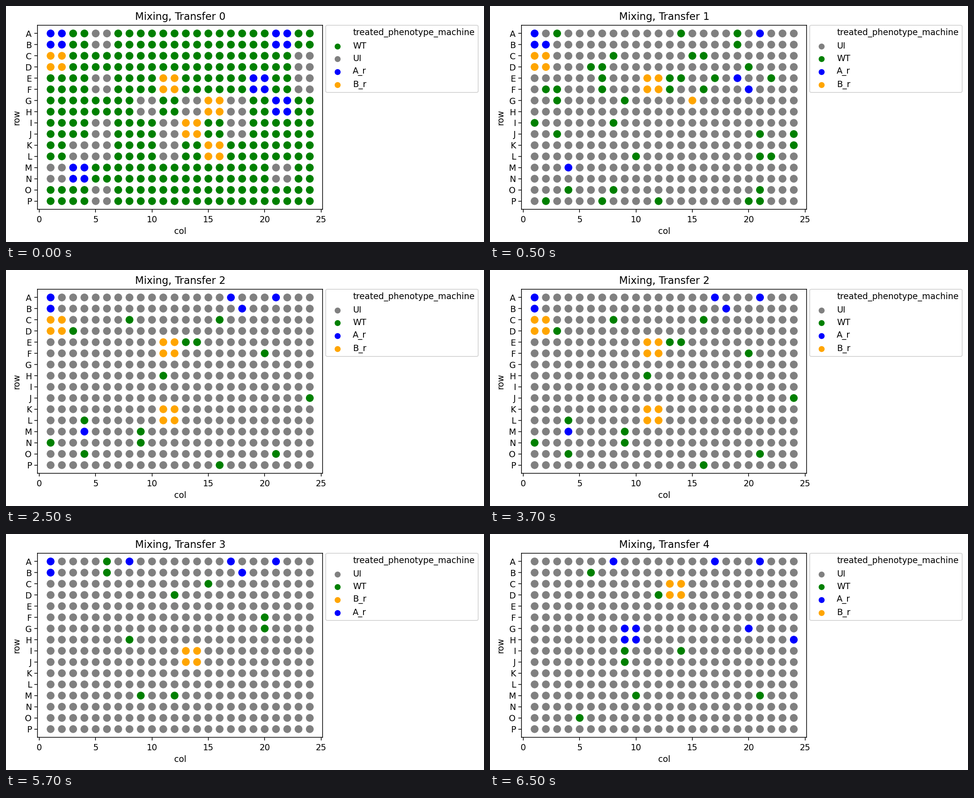
A matplotlib script that plays this animation: 1063x527 px, repeating every 8000 ms.

```python
import matplotlib.pyplot as plt
from matplotlib.animation import FuncAnimation
from matplotlib.colors import to_rgba

W, H, DPI = 1063, 527, 136
LEFT, TOP, RIGHT, BOTTOM = 70.4, 42.6, 704.4, 454.4
ROWS = "ABCDEFGHIJKLMNOP"
COLS = range(1, 25)
COLORS = {"WT": "green", "UI": "gray", "A_r": "blue", "B_r": "orange"}

# Each plate lists its phenotypes in legend order; the first one fills the rest.
# Wells are given singly (A1) or as a rectangle (A1:B2).
PLATES = [
    {"WT": "",
     "UI": "A5:B6 C23:F24 E5:F6 G9:H10 G13:H14 G17:J18 I5:L6 I11:L12 "
           "K3:L4 M1:N2 M21:N22 O5:P6",
     "A_r": "A1:B2 A21:B22 E19:F20 G21:H22 M3:N4",
     "B_r": "C1:D2 E11:F12 G15:H16 I13:J14 K15:L16"},
    {"UI": "",
     "WT": "A3 A14 A19:B19 C8 C15:C16 D6:D7 D20 E7:F7 E13:E14 E17 E22 "
           "F2:F3 F13 F16 G3 G9 I1 I8 J3 J21 J24:K24 L10 L21:L22 "
           "O4 O8 O21:P21 P2 P7 P12 P20",
     "A_r": "A1:B1 A21 B2 E19 F20 M4",
     "B_r": "C1:D2 E11:F12 G15"},
    {"UI": "",
     "WT": "C8 C16 D3 E13:E14 F20 H11 J24 L4 M9:N9 N1 O4 O21 P16",
     "A_r": "A1:B1 A17 A21 B18 M4",
     "B_r": "C1:D2 E11:F12 K11:L12"},
    {"UI": "",
     "WT": "A6:B6 C15 D12 F20:G20 H8 M9 M12",
     "B_r": "I13:J14",
     "A_r": "A1:B1 A8 A17 A21 B18"},
    {"UI": "",
     "WT": "B6 D12 I9:J9 I14 M10 M21 O5",
     "A_r": "A8 A17 A21 G9:H10 G20 H24",
     "B_r": "C13:D14"},
]


def parse(well):
    return ROWS.index(well[0]), int(well[1:])


def wells(spec):
    for item in spec.split():
        first, _, last = item.partition(":")
        r0, c0 = parse(first)
        r1, c1 = parse(last or first)
        for r in range(r0, r1 + 1):
            for c in range(c0, c1 + 1):
                yield r, c


def plate_colors(plate):
    base = next(iter(plate))
    kind = {(r, c): base for r in range(len(ROWS)) for c in COLS}
    for name, spec in plate.items():
        kind.update(dict.fromkeys(wells(spec), name))
    return [to_rgba(COLORS[k]) for k in kind.values()]


FACES = [plate_colors(p) for p in PLATES]

plt.rcParams["font.family"] = "DejaVu Sans"
fig = plt.figure(figsize=((W + 0.01) / DPI, (H + 0.01) / DPI), dpi=DPI)
ax = fig.add_axes([LEFT / W, 1 - BOTTOM / H,
                   (RIGHT - LEFT) / W, (BOTTOM - TOP) / H])
ax.set(xlim=(-0.15, 25.15), ylim=(15.75, -0.75), xlabel="col", ylabel="row",
       xticks=range(0, 26, 5))
ax.set_yticks(range(len(ROWS)), list(ROWS))
title = ax.set_title("")

grid = [(c, r) for r in range(len(ROWS)) for c in COLS]
dots = ax.scatter(*zip(*grid), s=100, linewidths=0.8, edgecolors="white")

keys = [ax.scatter([], [], s=36, color=c) for c in COLORS.values()]
header = ax.scatter([], [], s=0, color="white")
legend = ax.legend([header] + keys, ["treated_phenotype_machine", *COLORS],
                   loc="upper left", bbox_to_anchor=(1.01, 1),
                   borderaxespad=0)


def update(frame):
    step = (frame + 3) // 4
    title.set_text(f"Mixing, Transfer {step}")
    dots.set_facecolor(FACES[step])
    entries = zip(PLATES[step], legend.legend_handles[1:],
                  legend.get_texts()[1:])
    for name, handle, text in entries:
        handle.set_color(COLORS[name])
        text.set_text(name)
    return dots, title, legend


anim = FuncAnimation(fig, update, frames=16, interval=500, repeat=True,
                     repeat_delay=0, blit=False)
plt.show()
```
